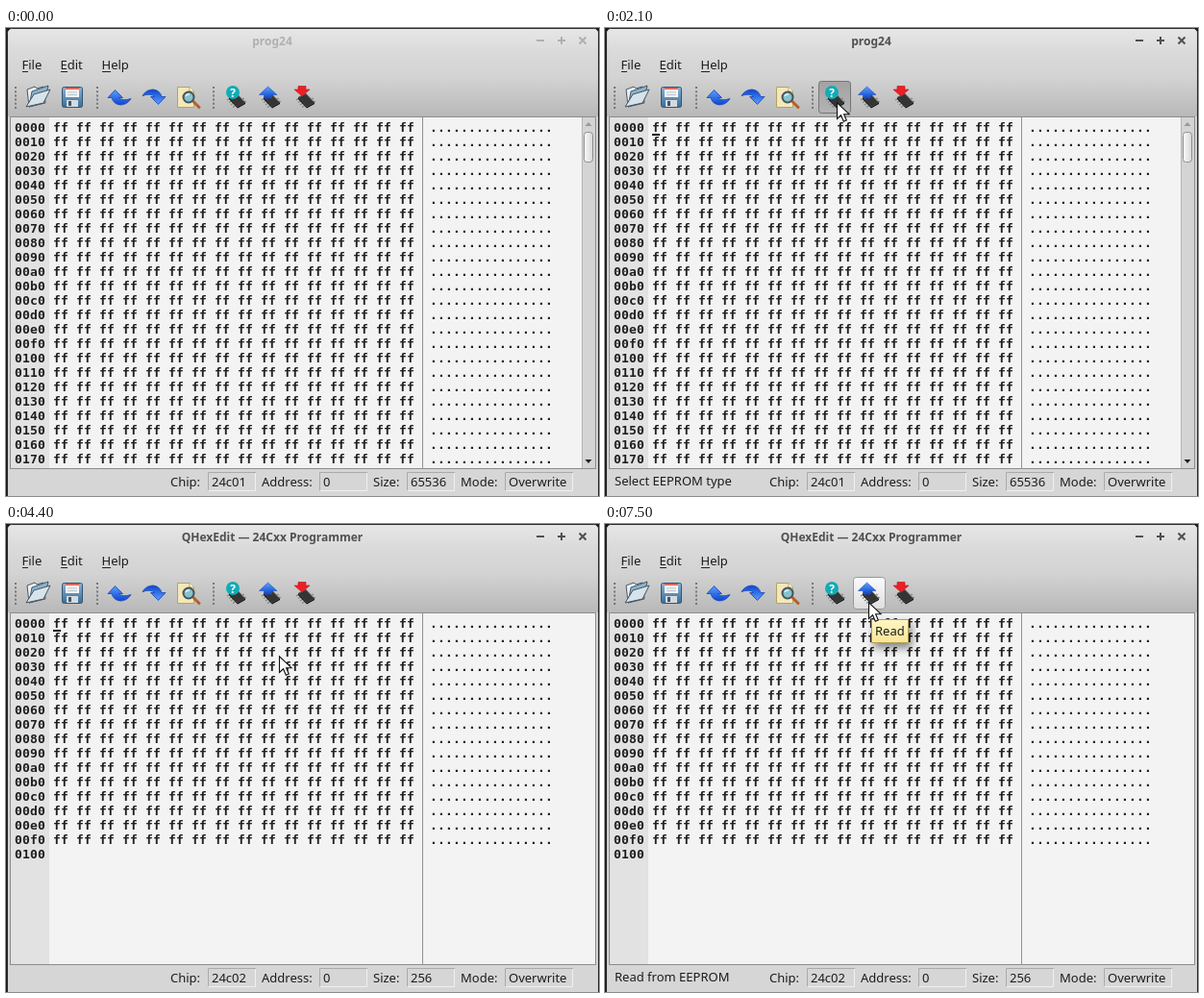
Animation, 617 px wide and 487 px high, one loop 8 s. Source, as an HTML page:

```html
<!DOCTYPE html>
<html lang="en">
<head>
<meta charset="utf-8">
<title>prog24</title>
<style>
html, body { margin: 0; width: 100%; height: 100%; overflow: hidden; background: #1c1c1c; }
svg { display: block; width: 617px; height: 487px; }
text { font: 13px "Noto Sans", "Open Sans", sans-serif; fill: #1c1c1c; white-space: pre; }
.title { font-size: 12px; font-weight: 700; fill: currentColor; text-anchor: middle; }
.bold { font-weight: 700; }
.mid { text-anchor: middle; }
.mono text { font: 700 13px "DejaVu Sans Mono", "Liberation Mono", monospace; letter-spacing: .174px; fill: #1f1f1f; }
.line { fill: none; stroke: currentColor; stroke-width: 2; }

/* one loop is 8 s, so 1.25% is 100 ms */
.t { animation: 8s step-end infinite; }
.bar { color: #b0b0b0; animation-name: bar; }
.old { animation-name: old; }
.new { visibility: hidden; animation-name: new; }
.undo, .redo, .find, .chip, .press, .dialog, .read, .tip, .caret, .mouse { visibility: hidden; }
.undo { animation-name: undo; }
.redo { animation-name: redo; }
.find { animation-name: find; }
.chip { animation-name: chip; }
.press { animation-name: press; }
.dialog { animation-name: dialog; }
.read { animation-name: read; }
.tip { animation-name: tip; }
.caret { animation-name: caret; }
.mouse { animation-name: mouse; }
.frame { filter: drop-shadow(0 2px 4px rgba(0, 0, 0, .5)); }
.tip rect { filter: drop-shadow(3px 5px 4px rgba(0, 0, 0, .45)); }

@keyframes bar { 0%, 28.75% { color: #b0b0b0 } 26.25%, 55% { color: #505050 } }
@keyframes old { 0% { visibility: visible } 55%, 100% { visibility: hidden } }
@keyframes new { 0% { visibility: hidden } 55%, 100% { visibility: visible } }
@keyframes undo { 0%, 11.25% { visibility: hidden } 10% { visibility: visible } }
@keyframes redo { 0%, 17.5% { visibility: hidden } 11.25% { visibility: visible } }
@keyframes find { 0%, 20% { visibility: hidden } 17.5% { visibility: visible } }
@keyframes chip { 0%, 28.75% { visibility: hidden } 21.25% { visibility: visible } }
@keyframes press { 0%, 27.5% { visibility: hidden } 26.25% { visibility: visible } }
@keyframes dialog { 0%, 55% { visibility: hidden } 28.75% { visibility: visible } }
@keyframes read { 0% { visibility: hidden } 67.5%, 100% { visibility: visible } }
@keyframes tip { 0% { visibility: hidden } 82.5%, 100% { visibility: visible } }
@keyframes caret {
  0%, 28.75%, 56.25%, 68.75%, 82.5%, 93.75% { visibility: hidden }
  26.25%, 55%, 62.5%, 75%, 87.5% { visibility: visible }
}
@keyframes mouse {
  0% { visibility: hidden; transform: translate(20px, 250px) }
  5% { visibility: visible; transform: translate(20px, 250px) }
  6.25% { visibility: visible; transform: translate(46px, 200px) }
  7.5% { visibility: visible; transform: translate(75px, 150px) }
  8.75% { visibility: visible; transform: translate(100px, 112px) }
  10% { visibility: visible; transform: translate(122px, 86px) }
  11.25% { visibility: visible; transform: translate(140px, 82px) }
  12.5% { visibility: visible; transform: translate(152px, 80px) }
  13.75% { visibility: visible; transform: translate(165px, 80px) }
  15% { visibility: visible; transform: translate(186px, 81px) }
  17.5% { visibility: visible; transform: translate(195px, 81px) }
  18.75% { visibility: visible; transform: translate(200px, 81px) }
  20% { visibility: visible; transform: translate(211px, 80px) }
  21.25% { visibility: visible; transform: translate(225px, 79px) }
  22.5% { visibility: visible; transform: translate(235px, 77px) }
  23.75% { visibility: visible; transform: translate(241px, 77px) }
  28.75% { visibility: visible; transform: translate(242px, 86px) }
  30% { visibility: visible; transform: translate(244px, 106px) }
  55% { visibility: visible; transform: translate(284px, 137px) }
  56.25% { visibility: visible; transform: translate(292px, 130px) }
  57.5% { visibility: visible; transform: translate(298px, 122px) }
  58.75% { visibility: visible; transform: translate(302px, 115px) }
  60% { visibility: visible; transform: translate(303px, 110px) }
  66.25% { visibility: visible; transform: translate(290px, 98px) }
  67.5% { visibility: visible; transform: translate(279px, 89px) }
  68.75% { visibility: visible; transform: translate(274px, 86px) }
  71.25% { visibility: visible; transform: translate(274px, 83px) }
  72.5%, 100% { visibility: visible; transform: translate(274px, 81px) }
}
</style>
</head>
<body>
<svg viewBox="0 0 617 487">
  <defs>
    <linearGradient id="top" x2="0" y2="1">
      <stop stop-color="#e6e6e6"/><stop offset=".3" stop-color="#d9d9d9"/>
      <stop offset=".55" stop-color="#d3d3d3"/><stop offset="1" stop-color="#b8b8b8"/>
    </linearGradient>
    <linearGradient id="lit" x2="0" y2="1"><stop stop-color="#fbfbfb"/><stop offset="1" stop-color="#dedede"/></linearGradient>
    <linearGradient id="push" x2="0" y2="1"><stop stop-color="#a2a2a2"/><stop offset="1" stop-color="#b4b4b4"/></linearGradient>
    <linearGradient id="blue" x2="0" y2="1"><stop stop-color="#5aa0ff"/><stop offset="1" stop-color="#0f45d0"/></linearGradient>
    <linearGradient id="steel" x2="0" y2="1"><stop stop-color="#88b4d6"/><stop offset="1" stop-color="#3d6c96"/></linearGradient>
    <linearGradient id="thumb"><stop stop-color="#fafafa"/><stop offset="1" stop-color="#d8d8d8"/></linearGradient>
    <linearGradient id="note" x2="0" y2="1"><stop stop-color="#fff6c4"/><stop offset="1" stop-color="#f8e596"/></linearGradient>
    <rect id="hover" x="-16.5" y="55.5" width="33" height="33" rx="3" fill="url(#lit)" stroke="#989898"/>
    <path id="grip" d="M0 61V84" stroke="#777" stroke-width="2" stroke-dasharray="2 2.2"/>
    <path id="plus" class="line" d="M-4 0H4M0 -4V4"/>
    <path id="cross" class="line" d="M-3.5 -3.5L3.5 3.5M3.5 -3.5L-3.5 3.5"/>
    <path id="arc" d="M-4.500 -7.500L3.500 .5H-.5Q3 4.500 12 1.500Q8 8 1 8Q-6 7.500 -8 .5H-12Z" fill="url(#blue)" stroke="#1744b4" stroke-width=".8"/>
    <g id="ic">
      <path d="M-4 -1L-7 1M-2 1.500L-5 3.500M0 4L-3 6M2 6.500L-1 8.500M9 -1L11 0M11 2L13 3" stroke="#858585" stroke-width="1.200"/>
      <path d="M-5 -2L3 -6L12 3.500L4 8Z" fill="#343434"/>
      <path d="M-5 -2L4 8V9.500L-5 0ZM4 8L12 3.500V5L4 9.500Z" fill="#111"/>
      <path d="M-3 -2.500L3 -5.300L10.500 2.500" fill="none" stroke="#5c5c5c" stroke-width=".8"/>
    </g>
  </defs>

  <rect x="1.500" y=".5" width="615" height="495" rx="5" fill="#d6d6d6" stroke="#2c2c2c"/>
  <path d="M2 92V6Q2 1 7 1H611Q616 1 616 6V92Z" fill="url(#top)"/>
  <g class="t bar">
    <text class="title t old" x="277" y="18">prog24</text>
    <text class="title t new" x="277" y="18">QHexEdit — 24Cxx Programmer</text>
    <path class="line" d="M552 13H560"/>
    <use href="#plus" x="578" y="13"/>
    <use href="#cross" x="600" y="13"/>
  </g>
  <text x="16.500" y="43">File</text><text x="56.500" y="43">Edit</text><text x="99.500" y="43">Help</text>
  <path d="M17 45.500H23M57 45.500H64M100 45.500H109" stroke="#222"/>

  <use href="#grip" x="10"/><use href="#grip" x="95"/><use href="#grip" x="216"/>
  <g class="t undo"><use href="#hover" x="118"/><text x="10" y="476">Undo</text></g>
  <g class="t redo"><use href="#hover" x="154"/><text x="10" y="476">Redo</text></g>
  <g class="t find"><use href="#hover" x="190"/><text x="10" y="476">Show the Dialog for findin</text></g>
  <g class="t chip"><use href="#hover" x="239"/><text x="10" y="476">Select EEPROM type</text></g>
  <g class="t read"><use href="#hover" x="275"/><text x="10" y="476">Read from EEPROM</text></g>
  <rect class="t press" x="222.500" y="55.500" width="33" height="33" rx="3" fill="url(#push)" stroke="#757575"/>

  <g id="open">
    <path d="M22 64L30 61L32 63L39 61L41 78L24 82Z" fill="#e9eef2" stroke="#4c5963"/>
    <path d="M27 66L44 60L40 77L24 82Z" fill="#8db3cf" stroke="#41596c"/>
    <path d="M21 82L29 69L46 64L39 78Z" fill="#d7e3ea" stroke="#46535d"/>
  </g>
  <g id="save">
    <rect x="58.500" y="61.500" width="21" height="21" rx="2" fill="url(#steel)" stroke="#31536f"/>
    <rect x="62" y="62" width="14" height="10" fill="#f5f7f9"/>
    <path d="M62 63H76" stroke="#d76b5e" stroke-width="2"/>
    <path d="M64 67H74M64 69.500H74" stroke="#b7bec4"/>
    <rect x="63" y="75" width="12" height="7" fill="#d5dade"/><rect x="65" y="76" width="3" height="5" fill="#3b5872"/>
  </g>
  <use href="#arc" x="118" y="72"/>
  <use href="#arc" transform="translate(154 72) rotate(180)"/>
  <g id="search">
    <path d="M178.500 61.500H191L195.500 66V82.500H178.500Z" fill="#f4e8b8" stroke="#b3a268"/>
    <path d="M191 61.500V66H195.500" fill="#fffbe6" stroke="#b3a268"/>
    <path d="M194.500 76L201 82.500" stroke="#b5602a" stroke-width="3" stroke-linecap="round"/>
    <circle cx="190" cy="72" r="5.500" fill="#86c3cc" stroke="#47535a" stroke-width="2"/>
    <path d="M187 71Q188 68.500 191 69" fill="none" stroke="#e3f5f7" stroke-width="1.500"/>
  </g>
  <use href="#ic" x="237" y="74"/>
  <circle cx="236" cy="67" r="7" fill="#12abb8"/>
  <text class="bold mid" x="236" y="71.500" style="font-size:12px;fill:#fff">?</text>
  <use href="#ic" x="273" y="74"/>
  <path d="M272.500 61L282 69.500H276.500V73H268.500V69.500H263.500Z" fill="url(#blue)" stroke="#1c50c8" stroke-width=".6"/>
  <use href="#ic" x="309" y="74"/>
  <path d="M304 60.500H312V64H316L308 71L300 64H304Z" fill="#ec2024" stroke="#bd1519" stroke-width=".6"/>

  <rect x="4.500" y="92.500" width="609" height="366" fill="#f3f3f3" stroke="#8c8c8c"/>
  <rect x="5" y="93" width="40" height="365" fill="#e2e2e2"/>
  <path d="M433.500 93V458" stroke="#909090"/>
  <g id="rows" class="mono"></g>
  <rect class="t caret" x="49" y="110" width="8" height="2" fill="#111"/>

  <g class="t old">
    <rect x="599" y="93" width="14" height="365" fill="#d4d4d4"/>
    <path d="M599.500 93V458" stroke="#b5b5b5"/>
    <rect x="601.500" y="108.500" width="9" height="31" rx="3" fill="url(#thumb)" stroke="#8e8e8e"/>
    <path d="M602.500 102L606 98L609.500 102Z" fill="#999"/>
    <path d="M602.500 449L606 453L609.500 449Z" fill="#222"/>
  </g>

  <g id="fields"></g>

  <g class="t dialog">
    <path class="frame" d="M186.500 416.500V75.500Q186.500 70.500 191.500 70.500H427Q432 70.500 432 75.500V416.500Z" fill="#d6d6d6" stroke="#6a6a6a"/>
    <path d="M187 96V76Q187 71 192 71H426.500Q431.500 71 431.500 76V96Z" fill="url(#lit)" opacity=".35"/>
    <g color="#686868">
      <text class="title" x="288.500" y="88">Dialog</text>
      <use href="#plus" x="393" y="83"/><use href="#cross" x="415" y="83"/>
    </g>
    <text class="bold mid" x="256" y="117">EEPROM</text>
    <text class="bold mid" x="257" y="130">model</text>
    <rect x="219.500" y="134.500" width="80" height="260" fill="#f3f3f3" stroke="#8c8c8c"/>
    <g id="models"></g>
    <rect x="340.500" y="105.500" width="78" height="26" rx="3" fill="url(#lit)" stroke="#8fa878"/>
    <rect x="340.500" y="139.500" width="78" height="26" rx="3" fill="url(#lit)" stroke="#959595"/>
    <text class="mid" x="379.500" y="123">OK</text>
    <text class="mid" x="379.500" y="157">Cancel</text>
    <path d="M371 125.500H380M360 159.500H367" stroke="#222"/>
  </g>

  <g class="t tip">
    <rect x="277.500" y="99.500" width="38" height="24" fill="url(#note)" stroke="#b39d58"/>
    <text x="281" y="116">Read</text>
  </g>
  <g class="t mouse">
    <path d="M.5 .8V17.500L4.500 13.800L7.300 20.300L10.300 19L7.600 12.700H13Z" fill="#fff" stroke="#111" stroke-width="1.100"/>
  </g>
</svg>
<script>
const put = (id, html) => { document.getElementById(id).innerHTML = html; };
const text = (x, y, s, cls = '') => `<text x="${x}" y="${y}" class="${cls}">${s}</text>`;
const list = (n, f) => Array.from({ length: n }, (_, i) => f(i)).join('');

// The small chip keeps 16 data rows and one empty address row.
put('rows', list(24, i => {
  const y = 108 + i * 15;
  const data = i > 15 ? 't old' : '';
  return text(9, y, (i * 16).toString(16).padStart(4, '0'), i > 16 ? 't old' : '')
    + text(49, y, Array(16).fill('ff').join(' '), data)
    + text(441, y, '.'.repeat(16), data);
}));

put('models', list(10, i => {
  const size = ['01', '02', '04', '08', 16, 32, 64, 128, 256, 512][i];
  return text(223, 150 + i * 20, '24c' + size, 'bold');
}));

const field = (label, x, boxX, w, a, b) => text(x, 477, label)
  + `<path d="M${boxX + .5} 481V462.5H${boxX + w}" fill="none" stroke="#aaa"/>`
  + `<path d="M${boxX + 1} 481.5H${boxX + w - .5}V463" fill="none" stroke="#f0f0f0"/>`
  + (b ? text(boxX + 4, 477, a, 't old') + text(boxX + 4, 477, b, 't new') : text(boxX + 4, 477, a));

put('fields', field('Chip:', 171, 210, 50, '24c01', '24c02')
  + field('Address:', 266, 326, 50, '0')
  + field('Size:', 382, 417, 50, '65536', '256')
  + field('Mode:', 473, 519, 71, 'Overwrite'));
</script>
</body>
</html>
```
